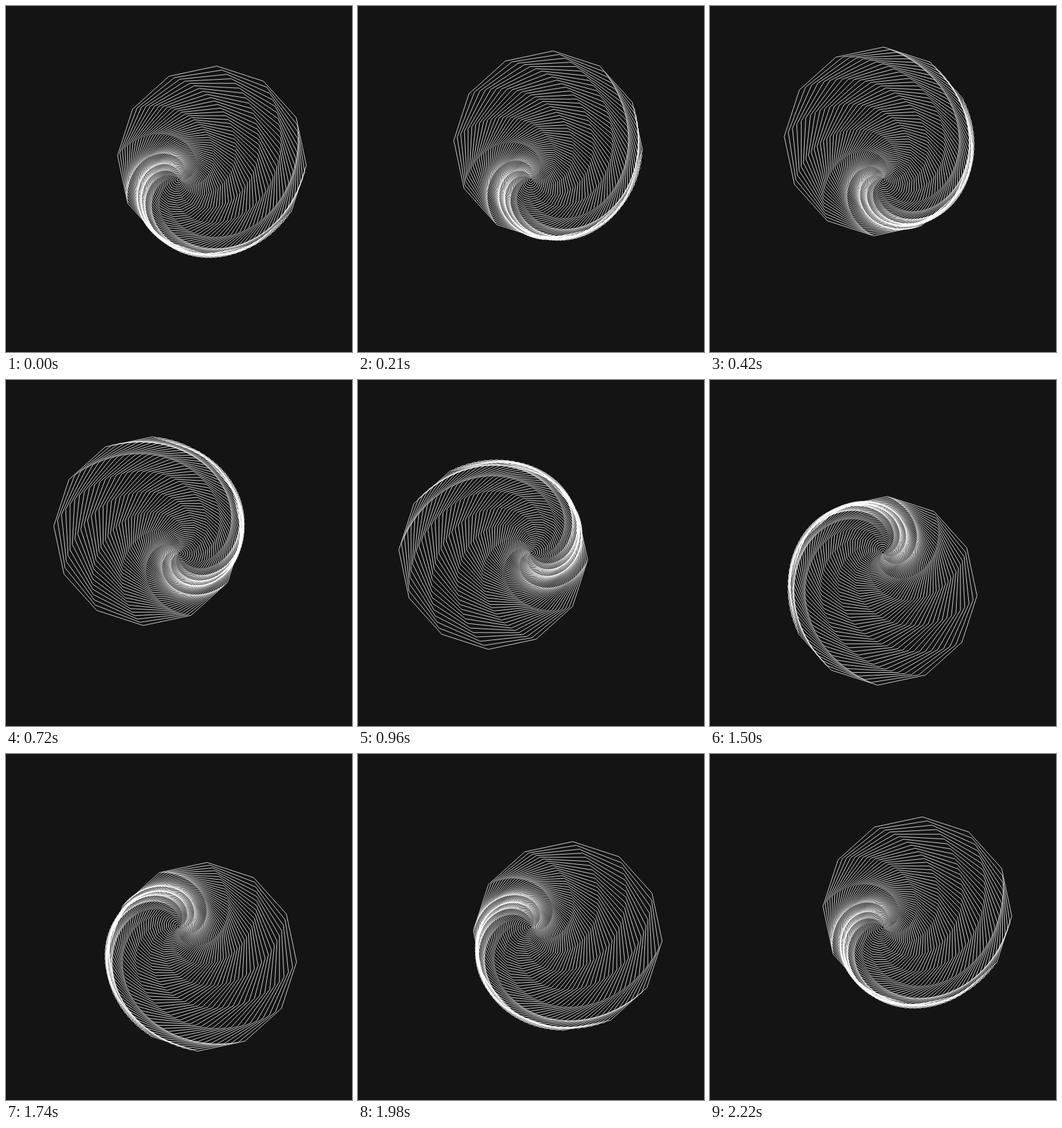
Recreate the animation shown at these times as an HTML page with a canvas. Size 540 px wide and 540 px high, loop 2.25 s.

```html
<!DOCTYPE html>
<html lang="en">
<head>
<meta charset="utf-8">
<title>Orbiting polygons</title>
<style>
  html, body { margin: 0; width: 100%; height: 100%; overflow: hidden; background: #141414; }
  canvas { display: block; }
</style>
</head>
<body>
<canvas id="stage" width="540" height="540"></canvas>
<script>
const ctx = document.getElementById('stage').getContext('2d');
const SIZE = 540;
const TAU = Math.PI * 2;
const LOOP = 2250;
const STEP = 30;
const RINGS = 60;
const SIDES = 12;
const MAX_RADIUS = 150;
const MAX_OFFSET = 60;
const TWIST = Math.PI / RINGS;
const START = 147.6 * Math.PI / 180;

function polygon(cx, cy, radius, rotation) {
  for (let k = 0; k < SIDES; k++) {
    const a = rotation + k * TAU / SIDES;
    ctx.lineTo(cx + radius * Math.cos(a), cy + radius * Math.sin(a));
  }
  ctx.closePath();
}

function draw(time) {
  const held = Math.floor((time % LOOP) / STEP) * STEP;
  const orbit = START - TAU * held / LOOP;

  ctx.fillStyle = '#141414';
  ctx.fillRect(0, 0, SIZE, SIZE);
  ctx.strokeStyle = '#fff';
  ctx.lineWidth = 0.8;

  // Each larger ring sits further out and is twisted a little more.
  for (let i = 1; i < RINGS; i++) {
    const scale = i / RINGS;
    const twist = -i * TWIST;
    const offset = MAX_OFFSET * scale;
    ctx.beginPath();
    polygon(
      SIZE / 2 + offset * Math.cos(orbit + twist),
      SIZE / 2 + offset * Math.sin(orbit + twist),
      MAX_RADIUS * scale,
      twist
    );
    ctx.stroke();
  }
}

let start;
function tick(now) {
  start ??= now;
  draw(Math.max(0, now - start));
  requestAnimationFrame(tick);
}
draw(0);
requestAnimationFrame(tick);
</script>
</body>
</html>
```
